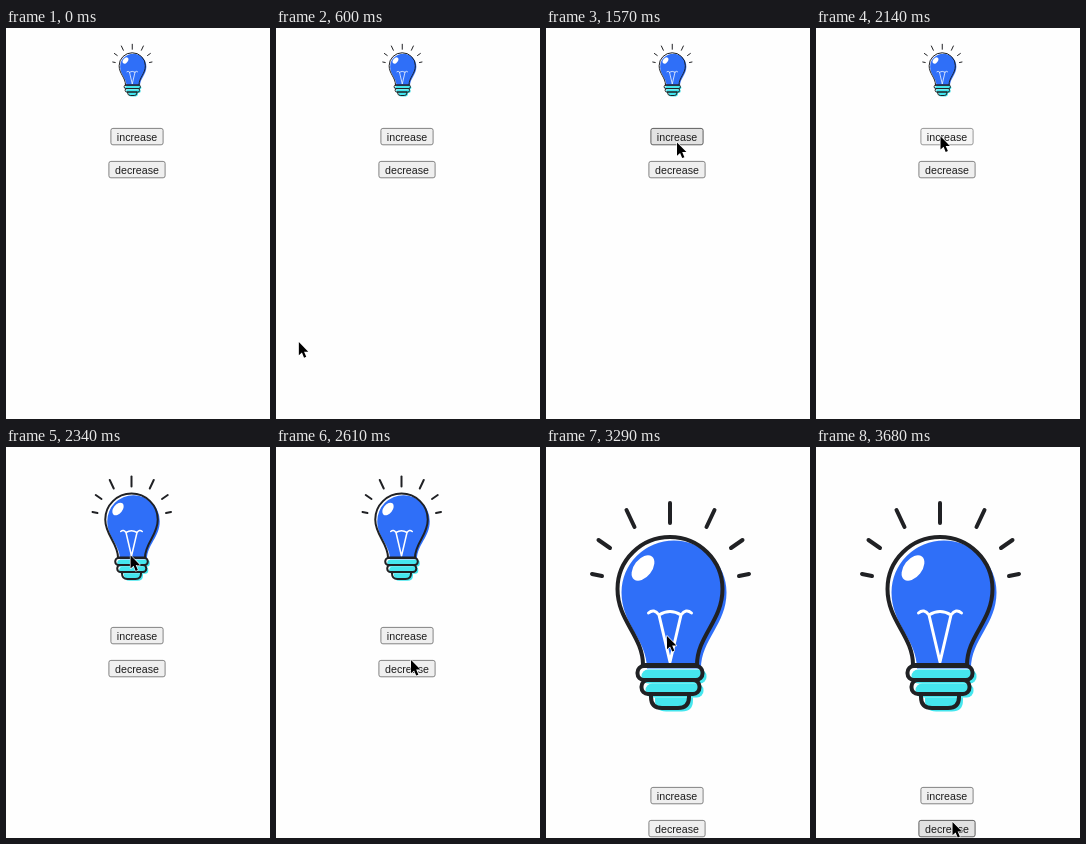
These frames come from a looping animation (264x391 px, 3780 ms). An HTML page:

```html
<!DOCTYPE html>
<html lang="en">
<head>
<meta charset="utf-8">
<title>Resizable bulb</title>
<style>
  html, body { margin: 0; width: 100%; height: 100%; overflow: hidden; background: #fefefe; }
  svg { display: block; width: 100%; height: 100%; }
  text { font: 10.67px "Liberation Sans", Arial, sans-serif; text-anchor: middle; fill: #1c1c1c; }
  .button rect { fill: #efefef; stroke: #767676; }
  .button.hover rect { fill: #e2e2e2; stroke: #4f4f4f; }
  .button.pressed rect { fill: #f5f5f5; stroke: #8d8d8d; }
  .ink, .filament { fill: none; stroke-linecap: round; stroke-linejoin: round; }
  .ink { stroke: #202124; stroke-width: 4; }
  .filament { stroke: #fff; stroke-width: 3; }
</style>
</head>
<body>
<svg viewBox="0 0 264 391">
  <defs>
    <path id="glass" d="M97 218C97 189 71.5 174 71.5 142A52.5 52 0 0 1 176.5 142C176.5 174 151 189 151 218Z"/>
    <g id="collar">
      <rect x="91.5" y="219" width="65" height="14" rx="6.5"/>
      <rect x="95.5" y="233" width="58" height="14" rx="6.5"/>
      <path d="M105 247H143V250Q143 261 132 261H116Q105 261 105 250Z"/>
    </g>
    <path id="sideRays" d="M80.5 63L88.5 80M52.5 93L64 101M46 127L56 129"/>
  </defs>

  <g id="bulb">
    <use href="#glass" x="4" y="3.5" fill="#2f6ff8"/>
    <use href="#collar" x="4" y="3.5" fill="#45e6ee"/>
    <ellipse cx="97" cy="121" rx="9" ry="14.5" transform="rotate(38 97 121)" fill="#fff"/>
    <path class="filament" d="M102.5 166Q108 161 113 168Q124 161 135 168Q140 161 145.5 166M113 168L124 215L135 168"/>
    <g class="ink">
      <use href="#glass"/>
      <use href="#collar"/>
      <path d="M124 56V76"/>
      <use href="#sideRays"/>
      <use href="#sideRays" transform="translate(249 0) scale(-1 1)"/>
    </g>
  </g>

  <g class="button" id="increase">
    <rect x="104.9" y="100.4" width="52.2" height="16.4" rx="2" stroke-width=".9"/>
    <text x="131" y="112.5">increase</text>
  </g>
  <g class="button" id="decrease">
    <rect x="102.9" y="133.4" width="56.2" height="16.4" rx="2" stroke-width=".9"/>
    <text x="131" y="145.7">decrease</text>
  </g>

  <path id="cursor" d="M0 0V13.2L3.1 10.4L5.2 15.6L7.4 14.7L5.2 9.6H9.4Z"
    fill="#000" stroke="#fff" stroke-width="1.2" paint-order="stroke" stroke-linejoin="round"/>
</svg>

<script>
const LOOP = 3780;
const STEP = 94; // approximate time between cursor poses
const entry = { x: -20, y: 335 };

// Each move continues from the last one; `bend` is the control point of a curve.
const moves = [
  { begin: 530, end: 1000, to: { x: 122.5, y: 232 }, bend: { x: 120, y: 270 } },
  { begin: 1100, end: 1570, to: { x: 131, y: 114.5 }, bend: { x: 165, y: 185 } },
  { begin: 1760, end: 1950, to: { x: 124.5, y: 108.3 } },
  { begin: 2430, end: 2610, to: { x: 135, y: 213 } },
  { begin: 2730, end: 3100, to: { x: 121, y: 189 } },
  { begin: 3500, end: 3680, to: { x: 136.5, y: 375 } }
];
const presses = [{ down: 2140, up: 2340 }, { down: 3190, up: 3290 }];

const byId = id => document.getElementById(id);
const [bulb, cursor, increase, decrease] = ["bulb", "cursor", "increase", "decrease"].map(byId);

const mix = (a, b, t) => ({ x: a.x + (b.x - a.x) * t, y: a.y + (b.y - a.y) * t });

function cursorAt(time) {
  const index = moves.filter(move => time >= move.begin).length - 1;
  if (index < 0) return null;
  const { begin, end, to, bend } = moves[index];
  const from = index ? moves[index - 1].to : entry;
  const intervals = Math.round((end - begin) / STEP);
  const pose = Math.min(intervals, Math.floor((time - begin) / (end - begin) * intervals));
  const t = (pose + 1) / (intervals + 1);
  return bend ? mix(mix(from, bend, t), mix(bend, to, t), t) : mix(from, to, t);
}

function drawButton(button, shift, tip, pressed) {
  const { x, y, width, height } = button.querySelector("rect").getBBox();
  const top = y + shift;
  const over = tip && tip.x >= x && tip.x <= x + width && tip.y >= top && tip.y <= top + height;
  button.setAttribute("transform", `translate(0 ${shift})`);
  button.setAttribute("class", "button" + (over ? pressed ? " pressed" : " hover" : ""));
}

function draw(time) {
  const clicks = presses.filter(({ up }) => time >= up).length;
  const pressed = presses.some(({ down, up }) => time >= down && time < up);
  const scale = 2 ** clicks / 4;
  const shift = 320 * scale - 80;
  const tip = cursorAt(time);

  bulb.setAttribute("transform", `translate(127 3) scale(${scale}) translate(-127 -3)`);
  drawButton(increase, shift, tip, pressed);
  drawButton(decrease, shift, tip, pressed);
  cursor.style.display = tip ? "" : "none";
  if (tip) cursor.setAttribute("transform", `translate(${tip.x} ${tip.y})`);
}

const start = performance.now();
function tick() {
  draw((performance.now() - start) % LOOP);
  requestAnimationFrame(tick);
}
tick();
</script>
</body>
</html>
```
